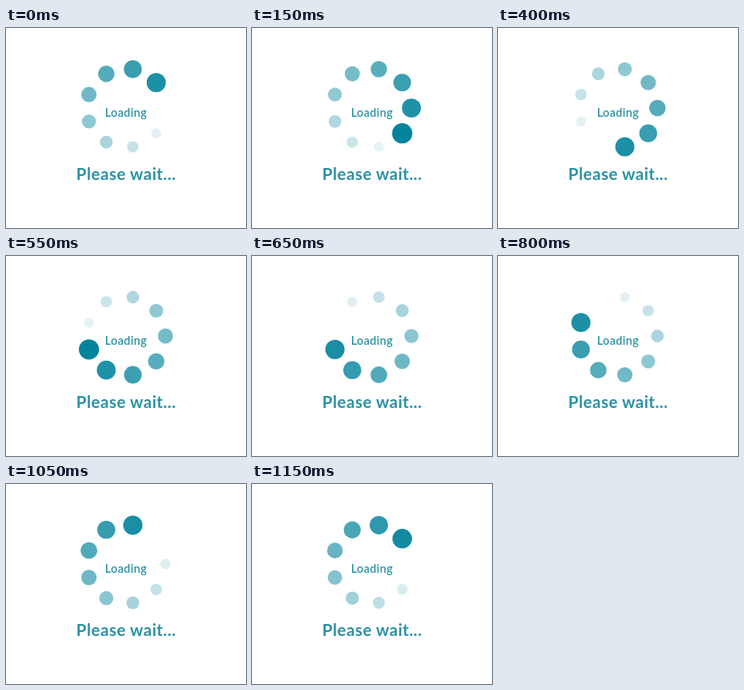
Write an HTML page that moves like this. It is 300 px wide and 250 px high and loops after 1.2 s.

```html
<!DOCTYPE html>
<html lang="en">
<head>
<meta charset="utf-8">
<title>Loading</title>
<style>
html, body { margin: 0; width: 100%; height: 100%; overflow: hidden; background: #fff; }
svg { display: block; }
text { font-family: Lato, Inter, sans-serif; font-weight: 700; fill: #2a91a5; text-anchor: middle; }
.label { font-size: 14.4px; font-weight: 600; letter-spacing: .4px; }
.wait { font-size: 20.5px; letter-spacing: .5px; }
</style>
</head>
<body>
<svg width="300" height="250" viewBox="0 0 300 250">
  <g id="dots" fill="#00829a"></g>
  <text class="label" x="150" y="111">Loading</text>
  <text class="wait" x="150.2" y="190">Please wait...</text>
</svg>
<script>
const LOOP = 1200, STEP = 50, COUNT = 9, RING = 49.3;
const group = document.getElementById("dots");

const dots = Array.from({ length: COUNT }, (_, i) => {
  const dot = document.createElementNS("http://www.w3.org/2000/svg", "circle");
  const angle = i / COUNT * 2 * Math.PI;
  dot.setAttribute("cx", 150 + RING * Math.cos(angle));
  dot.setAttribute("cy", 100 + RING * Math.sin(angle));
  return group.appendChild(dot);
});

// Each dot lights up in turn, then shrinks and fades over one loop.
function draw(now) {
  const t = Math.floor(now % LOOP / STEP) * STEP / LOOP;
  dots.forEach((dot, i) => {
    const age = (t - i / COUNT + 1) % 1;
    const lit = age > 1e-6 && age < 0.95;
    dot.setAttribute("r", 12.75 - 7.2 * age);
    dot.setAttribute("opacity", lit ? 1 - age : 0);
  });
}

let start;
function tick(now) {
  start ??= now;
  draw(now - start);
  requestAnimationFrame(tick);
}
draw(0);
requestAnimationFrame(tick);
</script>
</body>
</html>
```
